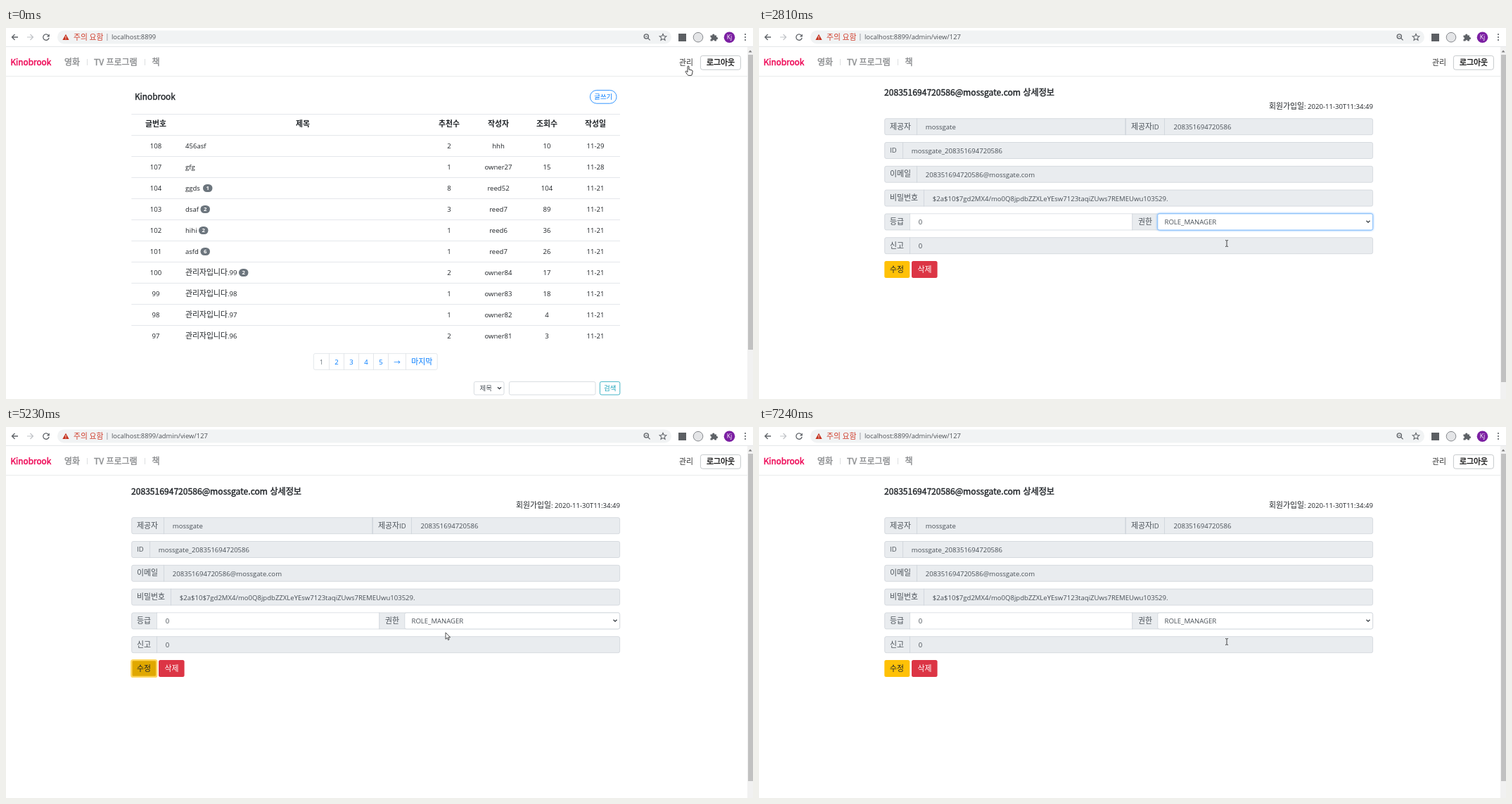
An HTML page for the animation above (7.31 s loop, 1062 by 527 pixels).

```html
<!DOCTYPE html>
<html lang="ko">
<head>
<meta charset="utf-8">
<title>Member admin</title>
<style>
html, body { margin: 0; width: 100%; height: 100%; overflow: hidden; background: #fff; }
svg { display: block; font-family: "Open Sans", "Noto Sans CJK KR", sans-serif; }
.cjk { font-family: "Noto Sans CJK KR", "Noto Sans CJK", sans-serif; }
.line { fill: none; stroke: #5f6368; stroke-width: 1.3; }
.shadow { filter: drop-shadow(0 1px 2px rgba(0, 0, 0, .35)); }
</style>
</head>
<body>
<svg id="stage" width="1062" height="527" viewBox="0 0 1062 527"></svg>
<script>
const LOOP = 7310;
const INK = '#212529', GRAY = '#6c757d', FIELD = '#495057', BLUE = '#007bff', EDGE = '#ced4da', RULE = '#dee2e6';
const TEAL = '#17a2b8';
const HAIR = .8; // border width of the scaled page
const LEFT = 178.3, RIGHT = 873;

// ---------- drawing helpers ----------
const rect = (x, y, w, h, fill, extra = '') =>
  `<rect x="${x}" y="${y}" width="${w}" height="${h}" fill="${fill}" ${extra}/>`;

const box = (x, y, w, h, fill = '#fff', stroke = EDGE, r = 2.3, extra = '') =>
  rect(x + HAIR / 2, y + HAIR / 2, w - HAIR, h - HAIR, fill, `stroke="${stroke}" stroke-width="${HAIR}" rx="${r}" ${extra}`);

const path = (d, extra = 'class="line"') => `<path d="${d}" ${extra}/>`;

const group = (id, body) => `<g id="${id}">${body}</g>`;

// y is the middle of the line; Hangul runs are set at their own scale; heavy thickens the strokes a little
function text(x, y, str, { size = 9.55, fill = INK, weight = 400, anchor = 'start', ko = 1.14, cls = '', id = '', heavy = 0 } = {}) {
  const body = str.replace(/[가-힣]+/g, run => `<tspan font-size="${(size * ko).toFixed(2)}">${run}</tspan>`);
  const stroke = heavy ? `stroke="${fill}" stroke-width="${heavy}"` : '';
  return `<text ${id && `id="${id}"`} class="${cls}" x="${x}" y="${(y + size * .37).toFixed(2)}" font-size="${size}" ` +
    `font-weight="${weight}" fill="${fill}" text-anchor="${anchor}" ${stroke}>${body}</text>`;
}
const mid = (x, y, str, opts) => text(x, y, str, { anchor: 'middle', ...opts });
const title = (x, y, str, opts) => text(x, y, str, { size: 12.1, heavy: .4, ko: 1, cls: 'cjk', ...opts });

const chevron = (x, y) => path(`M${x - 2.5} ${y - 1.3}l2.5 2.5 2.5-2.5`, 'fill="none" stroke="#343a40" stroke-width="1.3"');

// ---------- shared parts ----------
function browserBar() {
  return rect(0, 0, 1062, 26, '#fff') + rect(0, 26, 1062, HAIR, '#dfe1e4') +
    rect(73, 3.5, 873, 19, '#f1f3f4', 'rx="9.5"') +
    path('M17 13H8.5M12.5 9l-4 4 4 4') +
    path('M30 13h8.5M34.5 9l4 4-4 4', 'fill="none" stroke="#c0c3c7" stroke-width="1.2"') +
    group('reload', path('M60.2 10.4A4.2 4.2 0 1 0 61.1 14') + path('M61.8 8.4v4h-4z', 'fill="#5f6368"')) +
    group('stop', path('M53 9l8 8M61 9l-8 8')) +
    path('M85 8.8l4.6 8.2h-9.2z', 'fill="#c5321f"') + rect(84.5, 11.6, 1, 2.6, '#fff') + rect(84.5, 15, 1, 1, '#fff') +
    text(96, 13, '주의 요함', { fill: '#d0402f' }) + rect(143.5, 8, HAIR, 10, '#8b8f94') +
    text(150, 13, 'localhost:8899', { id: 'url', fill: '#4d5156', size: 9.4 }) +
    '<circle cx="910.3" cy="12" r="3.1" class="line"/>' + path('M912.6 14.4l3 3') + path('M908.8 12h3', 'stroke="#5f6368"') +
    path('M934 8.4l1.4 3.1 3.4.3-2.6 2.3.8 3.3-3-1.8-3 1.8.8-3.3-2.6-2.3 3.4-.3z',
      'fill="none" stroke="#5f6368" stroke-width="1.1"') +
    rect(956, 8, 11, 11, '#5c5f63') +
    '<circle cx="984" cy="13.2" r="6.8" fill="#e4e5e7" stroke="#85888c"/>' +
    path('M1001.5 10.5h2.7a1.6 1.6 0 1 1 3.1 0h2.7v2.6a1.6 1.6 0 1 1 0 3.1v2.3h-2.6a1.5 1.5 0 0 0-3 0h-2.9v-2.6a1.5 1.5 0 0 0 0-3z',
      'fill="#5f6368"') +
    '<circle cx="1028.5" cy="13.2" r="7.8" fill="#7b1fa2"/>' + mid(1028.5, 13.2, 'Kj', { fill: '#fff', size: 8.6 }) +
    [9, 13, 17].map(y => `<circle cx="1051" cy="${y}" r="1.1" fill="#5f6368"/>`).join('');
}

function siteNav() {
  const menu = { fill: '#8e9092', size: 12, heavy: .45 };
  return rect(0, 68, 1054, HAIR, '#e4e6e8') +
    title(6.5, 49, 'Kinobrook', { fill: '#ee0f5b', size: 11.8, heavy: .5 }) +
    title(83, 49, '영화', menu) + title(125, 49, 'TV 프로그램', menu) + title(207.5, 49, '책', menu) +
    rect(115, 44, HAIR, 9, '#d6d8da') + rect(197, 44, HAIR, 9, '#d6d8da') +
    text(957, 49, '관리', { fill: '#333' }) +
    box(987, 39, 57.8, 20.6, '#fff', '#b8bbbf', 3) + mid(1016, 49, '로그아웃', { heavy: .35, fill: '#111' }) +
    rect(1054, 27, 8, 500, '#f1f1f1') + path('M1055.6 34.5h5l-2.5-3z', 'fill="#7d7d7d"') +
    rect(1055, 38, 7, 465, '#c1c1c1', 'id="thumb"');
}

function searchBar(y, x, label) {
  const small = { size: 8.3, fill: FIELD }, h = 19.4;
  return box(x, y, 708.4 - x, h) + text(x + 8.5, y + 10, label, small) + chevron(701.5, y + 9.5) +
    box(715, y, 123.4, h) + box(844, y, RIGHT + .2 - 844, h, '#fff', TEAL) + mid(858.7, y + 10, '검색', { ...small, fill: TEAL });
}

function pager(y) {
  const edges = [437, 459, 480, 501, 522, 543, 568, 613.6];
  return box(437, y, 176.6, 23.8, '#fff', RULE) +
    edges.slice(1, -1).map(x => rect(x, y, HAIR, 23.8, RULE)).join('') +
    ['1', '2', '3', '4', '5', '→', '마지막'].map((s, i) =>
      mid((edges[i] + edges[i + 1] + 1) / 2, y + 12, s, { fill: i ? BLUE : GRAY })).join('');
}

const rules = (top, count) =>
  Array.from({ length: count }, (_, i) => rect(LEFT, top + i * 30, RIGHT - LEFT, HAIR, RULE)).join('');

// ---------- pages ----------
function homePage() {
  const posts = [
    [108, '456asf', 2, 'hhh', 10, '11-29'],
    [107, 'gfg', 1, 'owner27', 15, '11-28'],
    [104, 'ggds', 8, 'reed52', 104, '11-21', 280, 1],
    [103, 'dsaf', 3, 'reed7', 89, '11-21', 276.5, 2],
    [102, 'hihi', 1, 'reed6', 36, '11-21', 274, 2],
    [101, 'asfd', 1, 'reed7', 26, '11-21', 276.5, 6],
    [100, '관리자입니다.99', 2, 'owner84', 17, '11-21', 331, 2],
    [99, '관리자입니다.98', 1, 'owner83', 18, '11-21'],
    [98, '관리자입니다.97', 1, 'owner82', 4, '11-21'],
    [97, '관리자입니다.96', 2, 'owner81', 3, '11-21']
  ];
  const cols = [213, 422, 630, 700, 769, 838];
  const heads = ['글번호', '제목', '추천수', '작성자', '조회수', '작성일'];
  const row = (post, i) => {
    const y = 167 + i * 30, [badgeX, count] = post.slice(6);
    return cols.map((x, c) => c === 1 ? text(255, y, post[1]) : mid(x, y, String(post[c]))).join('') +
      (count ? rect(badgeX, y - 5, 13.5, 11, GRAY, 'rx="5.5"') +
        mid(badgeX + 6.75, y + .6, String(count), { size: 7.8, weight: 700, fill: '#fff' }) : '');
  };
  return title(183, 98, 'Kinobrook', { size: 11.8 }) +
    box(830, 88, 38.4, 19.6, '#fff', BLUE, 9.4) + mid(849.2, 98, '글쓰기', { size: 8.2, fill: BLUE }) +
    rules(122, 11) + heads.map((s, i) => mid(cols[i], 136.5, s, { weight: 700 })).join('') +
    posts.map(row).join('') + pager(462) + searchBar(502, 665, '제목');
}

const MEMBER = '208351694720586', PROVIDER = 'mossgate', MAIL = `${MEMBER}@${PROVIDER}.com`;

function listPage() {
  const members = [
    [127, `${PROVIDER}_${MEMBER}`, MAIL, '30T11:34:49'],
    [125, 'hollin_217540836195027348162', 'tam_k27@qelma.com', '30T11:29:26'],
    [124, 'nnn', 'nnn@nnn', '30T11:24:02'],
    [122, 'hhhh', 'hh@hhhh', '30T11:18:52'],
    [121, 'qwe', 'qwe@qwe', '30T11:17:08'],
    [120, 'hhh', 'hh@hh', '29T00:06:24'],
    [119, 'uu', 'uu@u', '22T13:40:51'],
    [117, 'pp', 'pp@p', '22T13:39:36'],
    [116, 'zz', 'zz@z', '22T13:32:50'],
    [115, 'hh', 'hh@h', '22T13:05:03']
  ];
  const cols = [186, 236.5, 476, 721];
  return searchBar(90, 656, '아이디') + rect(LEFT, 146, RIGHT - LEFT, 30, '#ececec', 'id="hoverRow"') + rules(116, 11) +
    ['번호', '아이디', '이메일', '가입일'].map((s, i) => text(cols[i], 130.5, s, { weight: 700 })).join('') +
    members.map(([no, name, mail, day], i) => {
      const y = 161 + i * 30;
      return text(cols[0], y, String(no)) +
        text(cols[1], y, name, { fill: BLUE, id: i ? '' : 'firstLink' }) +
        text(cols[2], y, mail) + text(cols[3], y, '2020-11-' + day);
    }).join('') +
    text(178, 460.5, '회원 수: 111', { fill: GRAY }) + pager(486);
}

function viewPage() {
  const SHADE = '#e9ecef', H = 23.8, field = { fill: FIELD };
  const rowY = i => 128.3 + 33.8 * i;
  const divider = (x, i) => rect(x, rowY(i), HAIR, H, EDGE);
  const label = (x, i, str) => text(x, rowY(i) + 11.8, str, field);
  const value = (x, i, str) => text(x, rowY(i) + 12.4, str, field);
  const bar = (i, split, name, content) =>
    box(LEFT, rowY(i), RIGHT - LEFT, H, SHADE) + divider(split, i) + label(186, i, name) + value(split + 12.8, i, content);
  return title(178, 91.5, `${MAIL} 상세정보`) +
    text(873, 111, '회원가입일: 2020-11-30T11:34:49', { anchor: 'end' }) +
    bar(0, 224, '제공자', PROVIDER) + divider(520.4, 0) + divider(521.2, 0) + divider(576.2, 0) +
    label(529, 0, '제공자ID') + value(589.5, 0, MEMBER) +
    bar(1, 204, 'ID', `${PROVIDER}_${MEMBER}`) +
    bar(2, 224, '이메일', MAIL) +
    bar(3, 234, '비밀번호', '$2a$10$7gd2MX4/mo0Q8jpdbZZXLeYEsw7123taqiZUws7REMEUwu103529.') +
    bar(4, 214, '등급', '') + rect(214.8, rowY(4) + HAIR, 315.6, H - 2 * HAIR, '#fff') + value(226.8, 4, '0') +
    divider(530.4, 4) + label(539, 4, '권한') +
    box(566.4, rowY(4), RIGHT - 566.4, H, '#fff', EDGE, 2.3, 'id="role"') + chevron(866, 275) +
    text(576.5, rowY(4) + 12.4, 'ROLE_MANAGER', { ...field, id: 'roleText' }) +
    bar(5, 214, '신고', '0') +
    rect(LEFT, rowY(6), 36, H, '#ffc107', 'rx="2.5" id="saveBtn"') + text(186, 343, '수정') +
    rect(217, rowY(6), 36.6, H, '#dc3545', 'rx="2.5"') + text(225.5, 343, '삭제', { fill: '#fff' }) +
    group('options', box(566, 288, 308, 45, '#fff', '#8a8d91', 0) + rect(567, 289, 306, 14.5, '#1e78e0', 'id="optionBar"') +
      ['ROLE_USER', 'ROLE_MANAGER', 'ROLE_ADMIN'].map((s, i) =>
        text(576.5, 296 + i * 14.5, s, { ...field, id: 'option' + i })).join('')) +
    group('dialog', box(375.4, 23.4, 312.2, 90.8, '#fff', '#a4a6a9', 2, 'class="shadow"') +
      text(387, 43, 'localhost:8899 내용:', { size: 10.1, ko: 1.1 }) +
      text(387, 63, `${MAIL} 님 정보 수정 완료`, { size: 8.7, ko: 1.2 }) +
      rect(631.5, 80.5, 45, 22.5, '#4a90f0', 'rx="2.5"') + mid(654, 91.5, '확인', { size: 7.8, fill: '#fff' }));
}

const pointer = '<circle id="click" cx="0" cy="1" r="8.3" fill="#d8cf38" fill-opacity=".85"/>' +
  path('M-1 1a1 1 0 0 1 2 0v4l4 .9q1.5.5 1.1 2.3l-.9 4q-.2 1.2-1.2 1.2H.6q-1 0-1.7-1l-2.8-4q-.2-1.6 1.4-1.1l1.5 1.4z',
    'id="hand" fill="#fff" stroke="#222" stroke-width=".9"') +
  path('M0 0v9.3l2.2-2 1.4 3.3 1.5-.7-1.4-3.1h2.9z', 'id="arrow" fill="#fff" stroke="#222" stroke-width=".8"') +
  path('M-2-4.5q2 0 2 1v7q0 1-2 1M2-4.5q-2 0-2 1M0 3.5q0 1 2 1', 'id="beam" fill="none" stroke="#333" stroke-width=".9"');

document.getElementById('stage').innerHTML = browserBar() + siteNav() +
  group('home', homePage()) + group('list', listPage()) + group('view', viewPage()) + group('pointer', pointer);

// ---------- timeline ----------
// bursts of evenly spaced updates: first, last, count
const bursts = [
  [0, 0, 1], [80, 230, 3], [410, 410, 1], [550, 1110, 8], [1260, 1420, 3], [1970, 2430, 7], [2740, 2810, 2],
  [2980, 3680, 10], [3760, 4290, 8], [4380, 4470, 2], [4540, 4770, 4], [5230, 5310, 2],
  [5470, 5620, 3], [5700, 6160, 7], [6240, 6700, 7], [7000, 7240, 4]
];

// pointer stops: time, x, y, shape from here on
const stops = [
  [0, 970, 54, 'hand'], [410, 970, 54, 'arrow'], [550, 955, 60, 'arrow'], [800, 600, 130, 'arrow'],
  [1020, 330, 161, 'hand'], [1110, 326, 160, 'hand'], [1260, 326, 160, 'arrow'], [1420, 469, 153, 'arrow'],
  [1970, 500, 170, 'arrow'], [2200, 680, 274, 'arrow'], [2420, 665, 304, 'arrow'], [2800, 665, 306, 'beam'],
  [2970, 665, 306, 'beam'], [3200, 430, 322, 'arrow'], [3430, 198, 346, 'hand'], [3670, 198, 348, 'arrow'],
  [3760, 203, 364, 'arrow'], [4210, 647.5, 95, 'arrow'], [4500, 647.5, 95, 'arrow'], [4760, 625, 292, 'arrow'],
  [5240, 625, 292, 'arrow'], [5300, 904, 186, 'arrow'], [5390, 904, 186, 'arrow'], [5620, 530, 172.5, 'arrow'],
  [5920, 334, 161, 'hand'], [6080, 327, 160, 'hand'], [6380, 327, 160, 'arrow'], [6620, 630, 200, 'beam'],
  [6700, 635, 208, 'beam'], [6960, 635, 208, 'beam'], [7230, 665, 305, 'beam'], [LOOP, 665, 305, 'beam']
];
const clicks = [[80, 230], [1020, 1100], [2190, 2270], [2740, 2800], [3590, 3670], [4280, 4460], [6080, 6150]];
const loading = [[410, 700], [1100, 1410], [6240, 6540]];

const el = id => document.getElementById(id);
const show = (id, on) => { el(id).style.display = on ? '' : 'none'; };
const set = (id, attrs) => { for (const key in attrs) el(id).setAttribute(key, attrs[key]); };
const within = (spans, t) => spans.some(([a, b]) => t >= a && t < b);

function snap(t) {
  const [a, b, n] = bursts.filter(burst => burst[0] <= t).pop();
  if (t >= b) return b;
  const step = (b - a) / (n - 1);
  return a + Math.floor((t - a) / step + .05) * step;
}

function pointerAt(t) {
  const i = stops.findIndex((stop, k) => k + 1 === stops.length - 1 || t < stops[k + 1][0]);
  const [t0, x0, y0, shape] = stops[i], [t1, x1, y1] = stops[i + 1];
  const k = (t - t0) / (t1 - t0);
  return { x: x0 + (x1 - x0) * k, y: y0 + (y1 - y0) * k, shape };
}

function render(now) {
  const t = snap(now);
  const { x, y, shape } = pointerAt(t);
  const page = t < 550 ? 'home' : t < 1260 || (t >= 5305 && t < 6390) ? 'list' : 'view';

  for (const id of ['home', 'list', 'view']) show(id, id === page);
  for (const id of ['hand', 'arrow', 'beam']) show(id, id === shape);
  el('pointer').setAttribute('transform', `translate(${x.toFixed(1)} ${y.toFixed(1)})`);
  show('click', within(clicks, t));

  const busy = within(loading, t);
  show('stop', busy);
  show('reload', !busy);
  el('url').textContent = 'localhost:8899' + { home: '', list: '/admin/userlist', view: '/admin/view/127' }[page];
  set('thumb', { height: page === 'home' ? 419 : 465 });

  const row = Math.floor((y - 146) / 30);
  show('hoverRow', row >= 0 && x < RIGHT);
  set('hoverRow', { y: 146 + row * 30 });
  set('firstLink', { fill: shape === 'hand' ? '#0056b3' : BLUE });

  const focused = t >= 2190 && t < 3590;
  set('role', { stroke: t >= 2190 && t < 5230 ? '#80bdff' : EDGE });
  el('role').style.filter = focused ? 'drop-shadow(0 0 1.5px #5aa9ff)' : '';
  el('roleText').textContent = t >= 1260 && t < 2800 ? 'ROLE_USER' : 'ROLE_MANAGER';

  const open = t >= 2270 && t < 2800, chosen = y > 303 ? 1 : 0;
  show('options', open);
  set('optionBar', { y: 289 + chosen * 14.5 });
  for (let i = 0; i < 3; i++) set('option' + i, { fill: i === chosen ? '#fff' : FIELD });

  const pressed = t >= 3590 && t < 5230, left = t >= 5230 && t < 5300;
  const hovered = t >= 3430 && t < 3590;
  set('saveBtn', {
    fill: pressed ? '#d39e00' : left || hovered ? '#e0a800' : '#ffc107',
    stroke: pressed || left ? '#ffd75e' : 'none', 'stroke-width': left ? 2.4 : 1
  });
  show('dialog', t >= 3670 && t < 4540);
}

const start = performance.now();
function frame() {
  render((performance.now() - start) % LOOP);
  requestAnimationFrame(frame);
}
frame();
</script>
</body>
</html>
```
